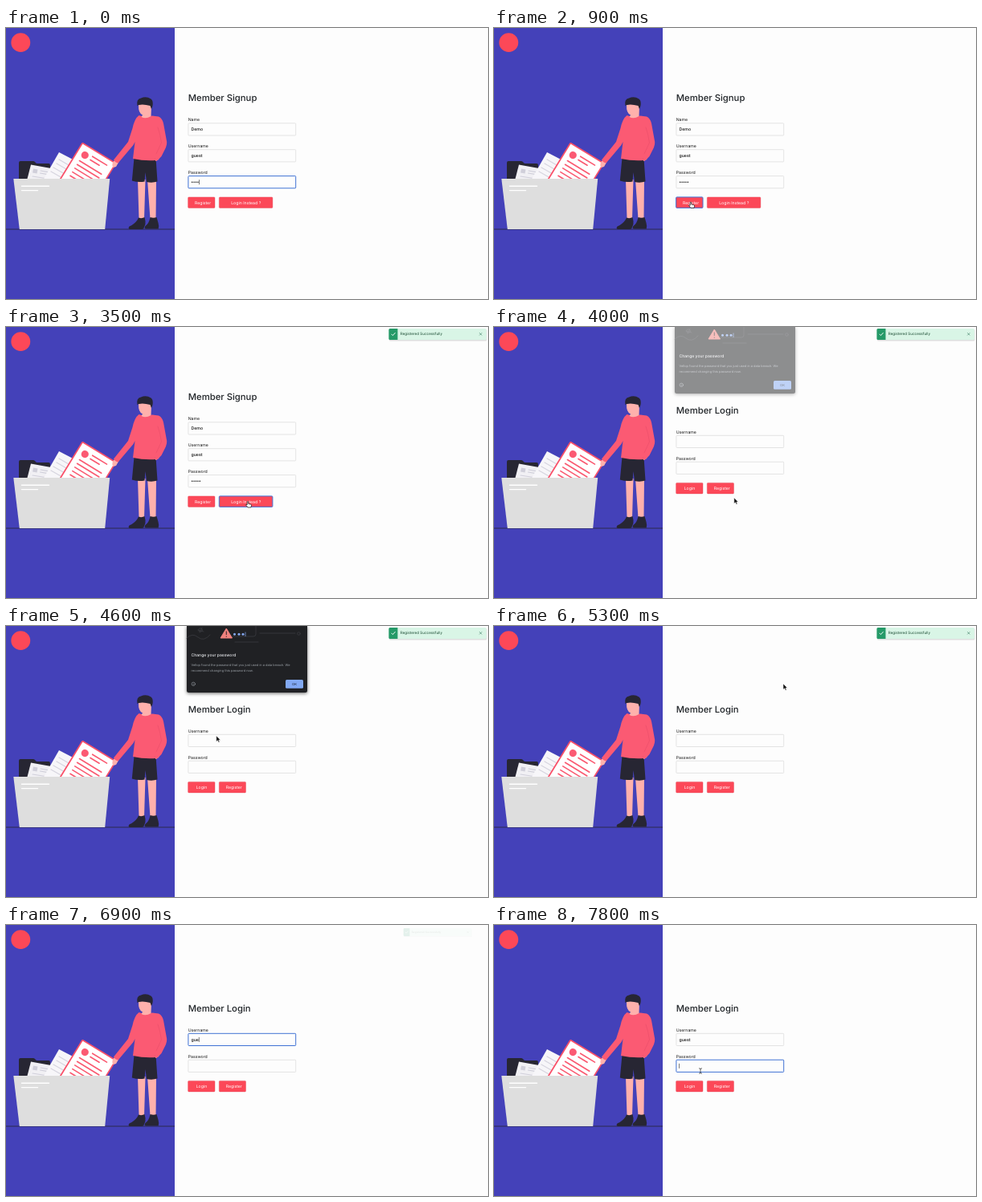
Recreate the animation shown at these times as an HTML page. Size 600 by 338 pixels, loop 8000 ms.

```html
<!DOCTYPE html>
<html lang="en">
<head>
<meta charset="utf-8">
<title>Member signup</title>
<style>
  html, body { margin: 0; width: 100%; height: 100%; overflow: hidden; background: #fdfdfd; }
  svg { display: block; width: 600px; height: 338px; }
  text { font: 5.2px Inter, "Liberation Sans", sans-serif; fill: #151515; white-space: pre; text-rendering: geometricPrecision; }
  .title { font-size: 11.3px; font-weight: 500; fill: #212529; }
  .value { font-weight: 500; fill: #0c0c0c; }
  .field rect { fill: #fdfdfd; stroke: #dedede; stroke-width: .8; }
  .button rect { fill: #fc4858; stroke: #e24455; stroke-width: .4; }
  .button text { fill: #fff; }
  .focus rect { stroke: #3f72d4; stroke-width: 1; }
  #popup { filter: drop-shadow(0 1px 2px #0009); }
  .alert { font-size: 5.05px; font-weight: 500; fill: #e8eaed; }
  .notice { font-size: 3.95px; fill: #9aa0a6; }
  .ok { font-size: 4px; font-weight: 500; fill: #202a3d; text-anchor: middle; }
  .done { font-size: 4.6px; fill: #17482f; }
  .hidden { display: none; }
  .dark { fill: #272633; }
  .skin { fill: #ffb1ac; }
  .red { fill: #fb5a73; }
  .stroke { fill: none; stroke-linecap: round; }
</style>
</head>
<body>
<svg viewBox="0 0 600 338">
  <rect width="600" height="338" fill="#fdfdfd"/>
  <rect width="210" height="338" fill="#4441b9"/>
  <circle cx="18.3" cy="18.2" r="11.9" fill="#fc4858"/>

  <g id="art">
    <path d="M0 251H210" stroke="#29283f" stroke-width=".9"/>
    <path class="dark" d="M16 190V168q0-2 2-2H34q1.500 0 2.500 1.500t2.500 1.500H53q2 0 2 2V190Z"/>
    <path d="M31 170.500L56 175 53 190H26Z" fill="#f1f0f4"/>
    <path d="M34 175.500l5.500 1-1 5-5.500-1Z" fill="#d0cfda"/>
    <path class="stroke" d="M43 178l9 1.600M42.500 181l8 1.400M33 185l16 2.500" stroke="#d0cfda" stroke-width="1.100"/>
    <path d="M66 155L91 168 78 190H46Z" fill="#f7f6f9"/>
    <path class="stroke" d="M66 164l12 7M63 169l12 7M59 174l14 8M56 179l14 8" stroke="#d6d4df" stroke-width="1.200"/>
    <g transform="translate(95 142.500) rotate(31.500)">
      <rect x=".7" y=".7" width="48.500" height="62" rx="1" fill="#fff" stroke="#fa5069" stroke-width="1.700"/>
      <circle class="red" cx="11.200" cy="12" r="4.600"/>
      <path class="stroke" d="M20 8.500H41M20 13.500H33M9 21.500H41M9 27H41M9 32.500H41M9 38H41M9 43.500H41" stroke="#fa5a71" stroke-width="1.600"/>
    </g>
    <path d="M9.300 188H129.200L123.200 251H16.800Z" fill="#dedede"/>
    <path class="stroke" d="M19.500 197.200H53.500M19.500 202.600H39.500" stroke="#fff" stroke-width="1.400"/>

    <path class="skin" d="M164 189H173.500L172 238H165.500ZM176 189H187L186.500 238H179.500Z"/>
    <path class="dark" d="M165 236.500q4 1.500 7.500-.5l1 5q.5 4-1.500 7.500-.5 2.500-3 2.500H154q-2.500-1-.5-3.500 6.500-3 10-8ZM179.500 236q4 1.500 8 0l2 7q1.200 4 .2 7.500H174q-2.500-1-.6-3.500Q178 244 179.500 236Z"/>
    <path class="dark" d="M159.500 162H186.500L188.500 191.500Q182 193.500 175 192L173.500 180 172.500 191.500Q165 193 156.800 190.500Z"/>
    <path class="skin" d="M138 162l-5 5.500q-1.500 4 .5 6.500l3.500-1 4-7ZM186 160l6-1-2 5-4 2Z"/>
    <path class="red" d="M165.500 109Q173 112 182 109.500L190 110.500Q194.500 112.500 196 119L200.200 142Q200.500 145 199 149L193.500 160Q189 165 187 166L185 161 186.500 165Q172 166 158 163L160.500 142 158.500 146 139.500 168.500Q136 168 134 164.500L152 142 157.500 125Q160 113 165.500 109Z"/>
    <path d="M189 124Q192 132 193.500 143L187 157" class="stroke" stroke="#e44b67" stroke-width=".5"/>
    <path class="skin" d="M165 96Q164.500 106 170 108.500L168.500 111Q174 114 180.500 110L181 97Q173 92 165 96Z"/>
    <path class="dark" d="M163.500 97Q161.800 88.500 168 87.500 174.500 84.800 180.500 88.500 183.800 91 182.300 98L181 101 179.500 97Q171 94.500 165 96Z"/>
  </g>

  <g id="signup"></g>
  <g id="login"></g>

  <g id="popup">
    <path d="M225 0H375V80.500q0 2.500-2.500 2.500H227.500q-2.500 0-2.500-2.500Z" fill="#202124"/>
    <path class="stroke" d="M225 15q7-7 14-1t15-3M239 5l7 2M241 8l3-6M311 0V10q0 3-3 3H276M316 9H360M285 20H314" stroke="#3a3c40" stroke-width=".8"/>
    <g class="stroke" stroke="#3a3c40" stroke-width=".8">
      <circle cx="242" cy="5" r="2.300"/>
      <circle cx="364.500" cy="9.500" r="1.800"/>
    </g>
    <path d="M274.300 3L281.500 15H267Z" fill="#f0827e" stroke="#f0827e" stroke-linejoin="round"/>
    <path d="M274.300 6.500V11M274.300 12.600V13.800" stroke="#40292b" stroke-width="1.100"/>
    <g fill="#86aaf2">
      <circle cx="284.500" cy="10.200" r="1.500"/>
      <circle cx="290" cy="10.200" r="1.500"/>
      <circle cx="295" cy="10.200" r="1.500"/>
    </g>
    <path d="M298 7.500V13" stroke="#86aaf2" stroke-width=".7"/>
    <text class="alert" x="230.500" y="38">Change your password</text>
    <text class="notice" x="230.500" y="50.300">Vellop found the password that you just used in a data breach. We</text>
    <text class="notice" x="230.500" y="57">recommend changing this password now.</text>
    <circle cx="233.300" cy="72.300" r="2.200" class="stroke" stroke="#9aa0a6" stroke-width=".6"/>
    <path d="M233.300 72V73.600M233.300 70.800V71.300" stroke="#9aa0a6" stroke-width=".6"/>
    <rect x="348" y="67" width="22" height="10.800" rx="1.500" fill="#82a9f3"/>
    <text class="ok" x="359" y="73.900">OK</text>
  </g>

  <g id="toast">
    <rect x="477" y="3" width="121.500" height="14.600" rx="1.500" fill="#000" opacity=".12"/>
    <rect x="476.500" y="2" width="121.500" height="14" rx="1.500" fill="#d9f5e6"/>
    <path d="M478 2H487.500V16H478q-1.500 0-1.500-1.500V3.500Q476.500 2 478 2Z" fill="#259a68"/>
    <path class="stroke" d="M480 9.100l1.500 1.500 2.800-3.200" stroke="#fff" stroke-width=".9"/>
    <text class="done" x="490.800" y="10.400">Registered Successfully</text>
    <path class="stroke" d="M589.500 7.500l2.600 2.600m0-2.600l-2.600 2.600" stroke="#4d8a70" stroke-width=".7"/>
  </g>

  <g id="pointer">
    <path id="arrow" d="M0 0V7.200L1.700 5.700 2.900 8.300 4.100 7.800 3 5.200H5.200Z" fill="#111" stroke="#fff" stroke-width=".5"/>
    <path id="hand" d="M-.8.500q.8-1 1.600 0V3l3 .7q.9.300.7 1.400L4 7.500H0L-2.600 4.300q0-1 1.800 0Z" fill="#fff" stroke="#111" stroke-width=".7"/>
    <path id="ibeam" class="stroke" d="M-1.500-3.200Q0-3.200 0-2.500 0-3.200 1.500-3.200M0-2.500V2.500M-1.500 3.200Q0 3.200 0 2.500 0 3.200 1.500 3.200" stroke="#222" stroke-width=".7"/>
  </g>
</svg>
<script>
const LOOP = 8000, STEP = 100;
const $ = id => document.getElementById(id);
const show = (id, on) => $(id).classList.toggle('hidden', !on);
const focus = (id, on) => $(id).classList.toggle('focus', on);
const clamp = v => Math.min(1, Math.max(0, v));
const smooth = v => v * v * (3 - 2 * v);

const field = (id, y, label, value = '') => `
  <text x="226.700" y="${y - 2.3}">${label}</text>
  <g class="field" id="${id}">
    <rect x="226.900" y="${y + .4}" width="133.800" height="15.200" rx=".8"/>
    <text class="value" x="230.500" y="${y + 9.8}">${value}</text>
    <rect class="caret hidden" y="${y + 5}" width=".6" height="6" style="fill:#222;stroke:none"/>
  </g>`;
const button = (id, x, y, w, pad, label) => `
  <g class="button" id="${id}">
    <rect x="${x}" y="${y}" width="${w}" height="13.500" rx="1"/>
    <text x="${x + pad}" y="${y + 8.7}">${label}</text>
  </g>`;
const title = (y, label) => `<text class="title" x="226.700" y="${y}">${label}</text>`;

$('signup').innerHTML = title(91.2, 'Member Signup') +
  field('name', 118.4, 'Name', 'Demo') +
  field('newUser', 151.3, 'Username', 'guest') +
  field('newPass', 184.2, 'Password') +
  button('register', 226.6, 210.9, 33.4, 8.4, 'Register') +
  button('goLogin', 265.3, 210.9, 66.6, 14.9, 'Login Instead ?') +
  [0, 1, 2, 3, 4].map(i => `<circle id="dot${i}" cx="${231.7 + i * 2.4}" cy="192.300" r=".75"/>`).join('');
$('login').innerHTML = title(107.6, 'Member Login') +
  field('user', 134.9, 'Username') +
  field('pass', 167.8, 'Password') +
  button('signIn', 226.6, 194.4, 33.4, 10.1, 'Login') +
  button('goSignup', 265.3, 194.4, 33.2, 8.4, 'Register');

// Pointer stops: time, x, y
const PATH = [
  [400, 262, 192], [800, 245, 217], [1300, 245, 217], [1800, 450.5, 70.5],
  [2100, 456, 65], [2400, 456, 65], [3200, 301, 217.5], [3900, 301, 217.5],
  [4600, 261.8, 137], [4700, 261.8, 137], [5200, 360, 72], [5300, 360, 72],
  [5700, 271, 152], [6000, 256, 143], [7300, 256, 143], [7600, 257, 182]
];
const KEYS = [6600, 6700, 6900, 7000, 7200];

function pointerAt(t) {
  const i = PATH.findIndex(p => p[0] > t);
  if (i === 0) return PATH[0].slice(1);
  if (i < 0) return PATH[PATH.length - 1].slice(1);
  const [a, x, y] = PATH[i - 1], [b, x2, y2] = PATH[i];
  const k = smooth((t - a) / (b - a));
  return [x + (x2 - x) * k, y + (y2 - y) * k];
}

function over(x, y, page, kind) {
  return [...document.querySelectorAll(`#${page} .${kind} > rect:first-child`)].some(r => {
    const b = r.getBBox();
    return x > b.x && x < b.x + b.width && y > b.y && y < b.y + b.height;
  });
}

function caret(id, on, x) {
  const el = $(id).querySelector('.caret');
  el.classList.toggle('hidden', !on);
  el.setAttribute('x', x);
}

function render(t) {
  const page = t < 3700 ? 'signup' : 'login';
  const popup = t >= 4000 && t < 5300;
  show('signup', page === 'signup');
  show('login', page === 'login');

  focus('newPass', t < 800);
  focus('register', t >= 800 && t < 3400);
  focus('goLogin', t >= 3400);
  show('dot4', t >= 100);
  caret('newPass', t < 600, t < 100 ? 240 : 242.4);

  const typing = t >= 6100 && t < 7500;
  const text = $('user').querySelector('text');
  text.textContent = 'guest'.slice(0, KEYS.filter(k => k <= t).length);
  focus('user', typing);
  focus('pass', t >= 7500);
  if (page === 'login') {
    const w = text.textContent ? text.getComputedTextLength() : 0;
    caret('user', typing, 230.5 + w);
    caret('pass', t >= 7500, 230.3);
  }

  show('popup', popup);
  $('popup').setAttribute('opacity', t < 4100 ? .5 : 1);

  const slide = 125 * (1 - clamp((t - 1300) / 400)) ** 3;
  const out = clamp((t - 6700) / 300);
  show('toast', t >= 1300 && out < 1);
  $('toast').setAttribute('opacity', (1 - out) ** 2);
  $('toast').setAttribute('transform',
    `translate(${537.5 + slide} 9) scale(${1 - .45 * out}) translate(-537.5 -9)`);

  const [x, y] = pointerAt(t);
  const kind = popup ? 'arrow' : over(x, y, page, 'button') ? 'hand'
    : over(x, y, page, 'field') ? 'ibeam' : 'arrow';
  show('pointer', t >= 400 && !(t >= 6600 && t < 7300));
  ['arrow', 'hand', 'ibeam'].forEach(k => show(k, k === kind));
  $('pointer').setAttribute('transform', `translate(${x} ${y})`);
}

let last = -1;
const start = performance.now();
function tick() {
  const t = Math.floor((performance.now() - start) % LOOP / STEP) * STEP;
  if (t !== last) render(last = t);
  requestAnimationFrame(tick);
}
tick();
</script>
</body>
</html>
```
